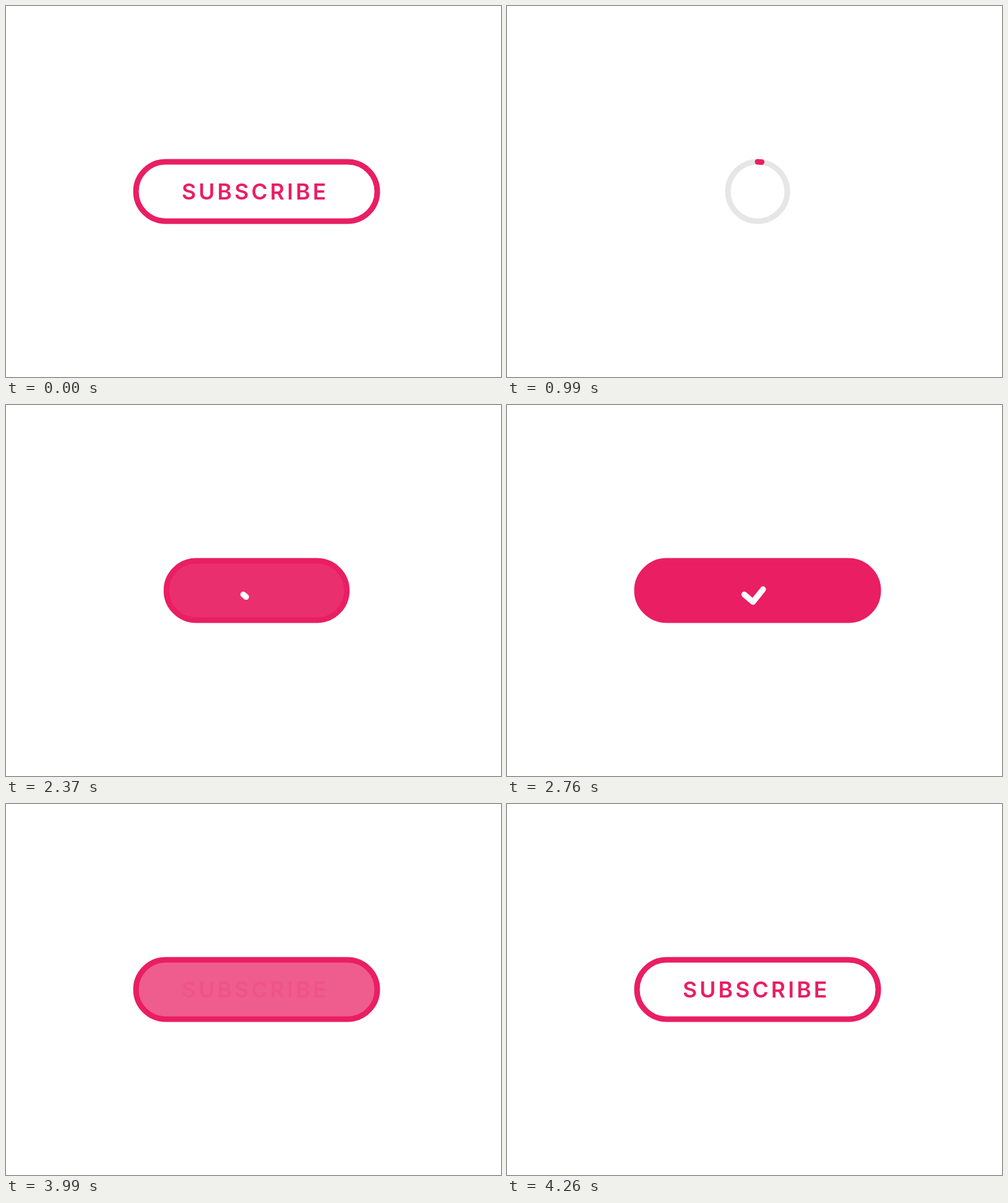
These frames come from a looping animation (800x600 px, 4950 ms). An HTML page:

```html
<!DOCTYPE html>
<html lang="en">
<head>
<meta charset="utf-8">
<title>Subscribe button</title>
<style>
  html, body { margin: 0; width: 100%; height: 100%; overflow: hidden; background: #fff; }
  svg { display: block; width: 800px; height: 600px; }
  text { font: 600 35.5px Inter, "Open Sans", sans-serif; letter-spacing: 4.2px; fill: #e91e63; }
</style>
</head>
<body>
<svg viewBox="0 0 800 600">
  <rect id="fill" y="252" height="96" rx="48" fill="#e91e63"/>
  <text id="label" x="284" y="313">SUBSCRIBE</text>
  <rect id="outline" y="252" height="96" rx="48" fill="none" stroke-width="9"/>
  <path id="progress" d="M405 252a48 48 0 0 1 0 96a48 48 0 0 1 0 -96" fill="none"
        stroke="#e91e63" stroke-width="9" stroke-linecap="round"/>
  <path id="check" d="M383.5 306.5L397.5 318.5L427 281.5" fill="none"
        stroke="#fff" stroke-width="9.5" stroke-linecap="round" stroke-linejoin="round"/>
</svg>
<script>
const LOOP = 4950, STEP = 30;
const PINK = [233, 30, 99], GREY = [230, 230, 230];
const [fill, label, outline, progress, check] =
  ['fill', 'label', 'outline', 'progress', 'check'].map(id => document.getElementById(id));

const ramp = (t, from, to) => Math.min(1, Math.max(0, (t - from) / (to - from)));
const ease = (t, from, to) => {
  const p = ramp(t, from, to);
  return p * p * (3 - 2 * p);
};

// Slow-starting curve: cubic-bezier(.97, 0, .6, 1), solved by bisection.
function lateEase(t, from, to) {
  const x = ramp(t, from, to);
  let low = 0, high = 1;
  for (let i = 0; i < 24; i++) {
    const s = (low + high) / 2, r = 1 - s;
    if (3 * r * r * s * 0.97 + 3 * r * s * s * 0.6 + s ** 3 < x) low = s;
    else high = s;
  }
  return x === 0 ? 0 : x === 1 ? 1 : low * low * (3 - 2 * low);
}

function drawPart(path, share) {
  const length = path.getTotalLength();
  path.style.display = share > 0 ? '' : 'none';
  path.setAttribute('stroke-dasharray', share < 1 ? `${length * share} ${length * 2}` : 'none');
}

function setWidth(rect, width) {
  rect.setAttribute('x', 405 - width / 2);
  rect.setAttribute('width', width);
}

function render(t) {
  const width = 390 - 294 * (ease(t, 150, 690) - ease(t, 2015, 2595));
  setWidth(fill, width);
  setWidth(outline, width);

  const grey = t < 1890 ? ease(t, 150, 690) : 0;
  const color = PINK.map((c, i) => Math.round(c + (GREY[i] - c) * grey));
  outline.setAttribute('stroke', `rgb(${color})`);

  fill.setAttribute('opacity', ease(t, 2015, 2443) - ease(t, 3847, 4260));
  label.setAttribute('opacity', 1 - ease(t, 150, 430) + ease(t, 3915, 4260));
  drawPart(progress, t < 1890 ? lateEase(t, 725, 1890) : 0);
  drawPart(check, ease(t, 2204, 3100) - ease(t, 3435, 3900));
}

const start = performance.now();
function tick() {
  const t = (performance.now() - start) % LOOP;
  render(Math.floor(t / STEP) * STEP);
  requestAnimationFrame(tick);
}
tick();
</script>
</body>
</html>
```
